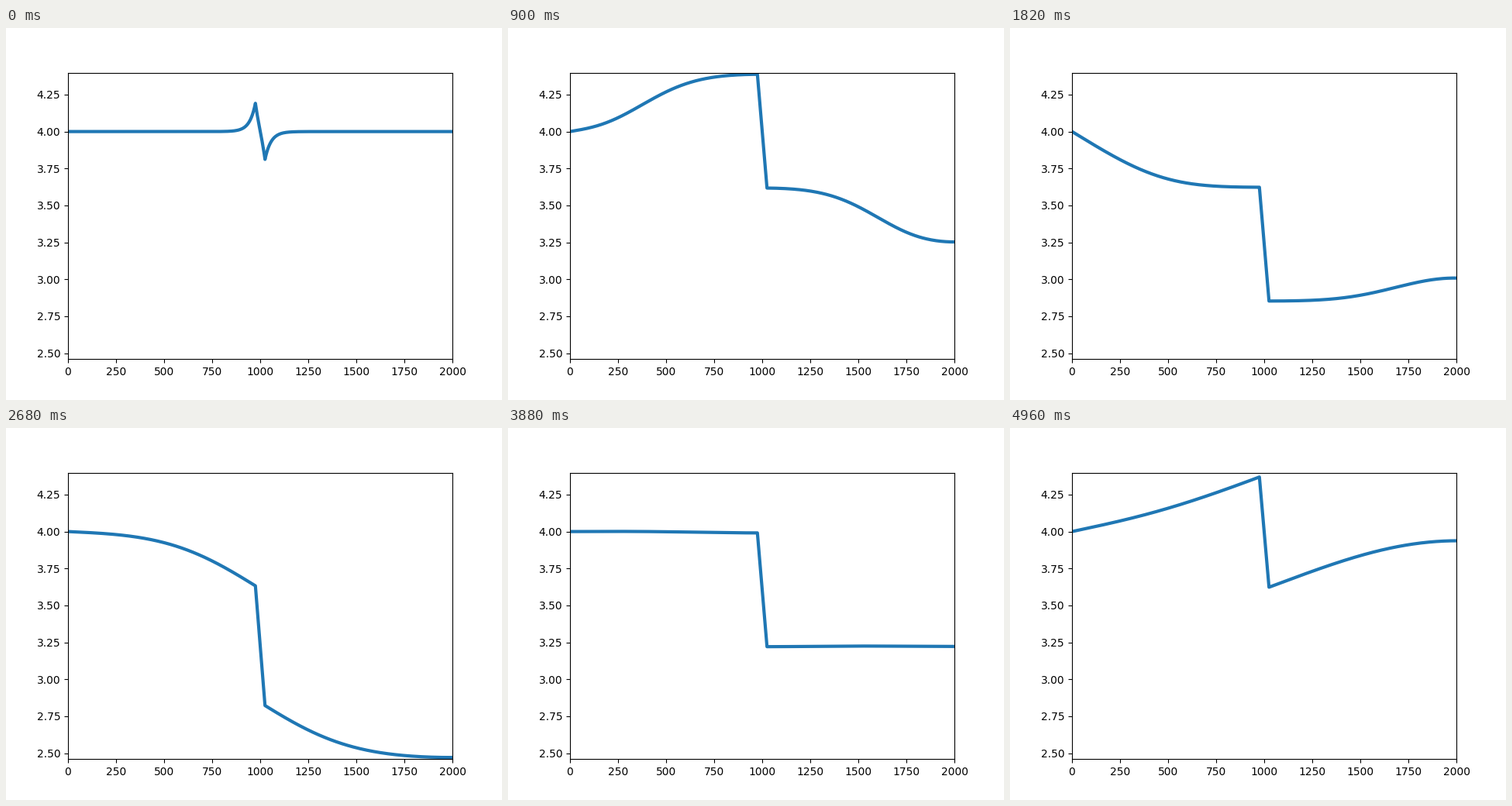
These frames come from a looping animation (640 px wide and 480 px high, 4980 ms). A matplotlib script:

```python
import numpy as np
import matplotlib.pyplot as plt
from matplotlib.animation import FuncAnimation

FRAMES, INTERVAL = 249, 20
LENGTH, CELLS = 2000.0, 400
P0 = 4.0        # pressure held at the inlet
DROP = 0.77     # pressure drop over the valve
REACH = 30.82   # distance a wave travels in one step
MACH = 0.019    # mean flow relative to the wave speed


def simulate():
    """Implicit Euler for a pipe: open inlet, closed end, valve in the middle."""
    n, dx = CELLS, LENGTH / CELLS
    x = np.linspace(0, LENGTH, n + 1)
    mid = (x[:-1] + x[1:]) / 2

    # pressure lives on the nodes, velocity on the midpoints
    grad = (np.eye(n, n + 1, 1) - np.eye(n, n + 1)) / dx
    div = -grad.T.copy()
    div[0] = 0
    div[-1] *= 2
    to_mid = (np.eye(n, n + 1, 1) + np.eye(n, n + 1)) / 2
    to_node = to_mid.T.copy()
    to_node[[0, -1]] = 0

    flow = np.block([[MACH * to_node @ grad, div],
                     [grad, MACH * to_mid @ div]])
    step = np.linalg.inv(np.eye(2 * n + 1) + REACH * flow)

    force = np.zeros(2 * n + 1)
    force[n + 1:] = np.where(np.abs(mid - LENGTH / 2) < 25, DROP / 50, 0)

    state = np.zeros(2 * n + 1)
    history = []
    for _ in range(FRAMES):
        state = step @ (state - REACH * force)
        history.append(P0 + state[:n + 1])
    return x, history


x, pressure = simulate()

fig, ax = plt.subplots(figsize=(6.4, 4.8), dpi=100)
line, = ax.plot(x, pressure[0], lw=3)
ax.set_xlim(0, LENGTH)
ax.set_ylim(2.4596, 4.3989)


def update(i):
    line.set_ydata(pressure[i])
    return line,


anim = FuncAnimation(fig, update, frames=FRAMES, interval=INTERVAL,
                     repeat=True, repeat_delay=0)
plt.show()
```
